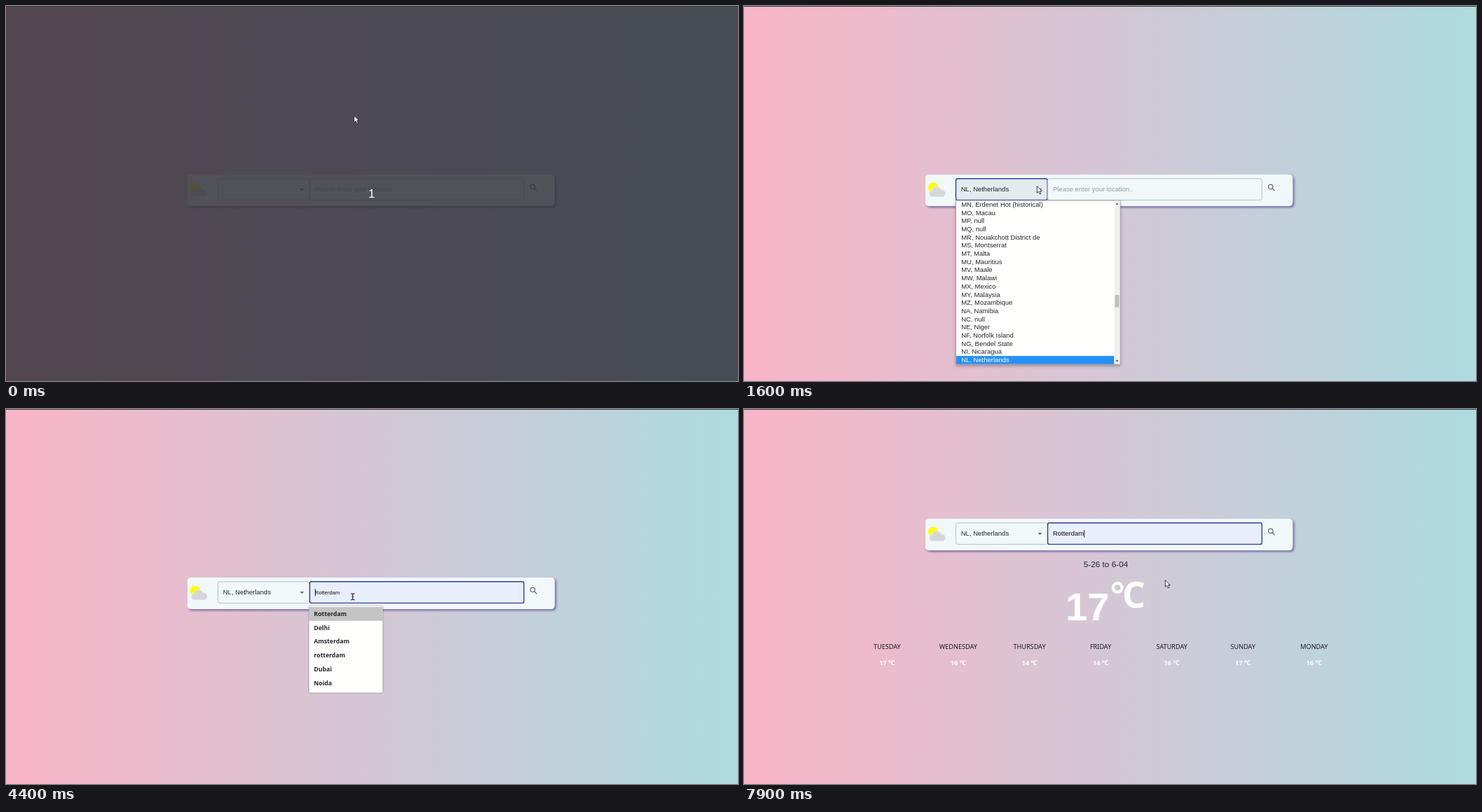
An HTML page that plays this animation: 1045 by 536 pixels, repeating every 8000 ms.

```html
<!DOCTYPE html>
<html lang="en">
<head>
<meta charset="utf-8">
<title>Weather search</title>
<style>
  html, body { margin: 0; width: 100%; height: 100%; overflow: hidden; }
  svg { display: block; width: 1045px; height: 536px; }
  text { font: 9.46px "Liberation Sans", Arial, sans-serif; fill: #222628; white-space: pre; }
  .ui { font-family: "Noto Sans", "Open Sans", sans-serif; }
  .field { fill: none; stroke: #b9c0c3; stroke-width: 1; }
  .field.hover { stroke: #34383c; }
  .field.focus { stroke: #303f9f; stroke-width: 1.4; }
  .hint { fill: #959b9e; }
  .entry { font-size: 8.7px; font-weight: 600; }
  .day { font-size: 9.15px; text-anchor: middle; fill: #1c1c20; }
  .temp { font-size: 9.2px; font-weight: 700; text-anchor: middle; fill: #fff; }
  .big { font-size: 56px; font-weight: 700; fill: #fff; }
</style>
</head>
<body>
<svg viewBox="0 0 1045 536">
  <defs>
    <linearGradient id="sky">
      <stop offset=".015" stop-color="#f8b5c7"/>
      <stop offset=".5" stop-color="#d4c7d5"/>
      <stop offset=".985" stop-color="#aedae0"/>
    </linearGradient>
    <clipPath id="listClip"><rect x="303" y="278.5" width="233.5" height="233"/></clipPath>
  </defs>
  <rect width="1045" height="536" fill="url(#sky)"/>
  <rect width="1045" height="1" fill="#3b3a40"/>

  <g id="results">
    <text x="516.5" y="225.7" text-anchor="middle" style="font-size:11.8px">5-26 to 6-04</text>
    <text class="big" x="459" y="302.3">17</text>
    <circle cx="533.3" cy="255.4" r="6.4" fill="none" stroke="#fff" stroke-width="4.2"/>
    <text class="big ui" x="540" y="283.6" style="font-size:52px">C</text>
    <g id="week"></g>
  </g>

  <g id="bar">
    <rect x="258.5" y="240.5" width="525" height="45.5" rx="5.5" fill="#f0f8fa"
      style="filter:drop-shadow(2px 2px 1.5px rgba(104,92,160,.65)) drop-shadow(0 0 .6px rgba(104,92,160,.6))"/>
    <circle cx="270" cy="259.6" r="7.2" fill="#ff0"/>
    <path d="M268.6 273a4.7 4.7 0 0 1-.4-9.3 7 7 0 0 1 13.2-1.2 5.4 5.4 0 0 1 2.4 10.5z"
      fill="#d6d6d6" stroke="#f0f8fa" stroke-width=".7"/>
    <rect id="select" class="field" x="302.5" y="246.8" width="130.7" height="30.6" rx="2.4"/>
    <text id="country" x="309.8" y="265.3">NL, Netherlands</text>
    <path d="M419.4 260.9h6.2l-3.1 3.2z" fill="#666b6d"/>
    <rect id="input" class="field" x="433.6" y="246.8" width="305.8" height="30.6" rx="2.4"/>
    <text id="hint" class="hint" x="441" y="265.3">Please enter your location..</text>
    <text id="city" x="441" y="265.3" style="fill:#0c0c10">Rotterdam</text>
    <rect id="caret" y="257" width="1" height="10.4" fill="#222"/>
    <g transform="translate(746.2 252.7) scale(.59)" fill="none" stroke="#62676a" stroke-width="2.1">
      <circle cx="9.5" cy="9.5" r="5.5"/><path d="M13.6 13.6l6.1 6.1"/>
    </g>
  </g>

  <g id="list">
    <rect x="302.5" y="278" width="234.5" height="234" fill="#fffffe" stroke="#a9a9ad"
      style="filter:drop-shadow(0 2px 2px rgba(0,0,0,.3))"/>
    <rect id="mark" x="303" width="225.5" height="11.6" fill="#2490f5"/>
    <g id="rows" clip-path="url(#listClip)"></g>
    <rect x="528.5" y="278.5" width="8" height="233" fill="#f0f0f0"/>
    <rect id="thumb" x="529.6" width="6" height="17.5" fill="#bfbfc0"/>
    <path d="M530.6 283.7h4l-2-2.4zM530.6 506.3h4l-2 2.4z" fill="#444"/>
  </g>

  <g id="popup">
    <rect x="432.7" y="281.5" width="105" height="124" rx="1.5" fill="#fffffe"
      style="filter:drop-shadow(0 .6px .8px rgba(0,0,0,.45))"/>
    <rect id="pick" x="432.7" y="283" width="105" height="19.7" fill="#c4c4c4"/>
    <g id="entries"></g>
  </g>

  <g id="dim">
    <rect width="1045" height="536" fill="rgb(53,52,60)" opacity=".85"/>
    <text x="522" y="274" text-anchor="middle" style="font-size:17px;fill:#fff">1</text>
  </g>

  <path id="arrow" d="M0 0V9.8L2.3 7.7 4 11.4 5.7 10.6 4 7H7z" fill="#fff" stroke="#26262c" stroke-width=".9"/>
  <g id="beam" fill="none">
    <path d="M-2.8-4.4Q0-4.6 0-3V3Q0 4.6-2.8 4.4M2.8-4.4Q0-4.6 0-3V3Q0 4.6 2.8 4.4" stroke="#fff" stroke-width="2.2" opacity=".6"/>
    <path d="M-2.8-4.4Q0-4.6 0-3V3Q0 4.6-2.8 4.4M2.8-4.4Q0-4.6 0-3V3Q0 4.6 2.8 4.4M-1.3 0h2.6" stroke="#2c2c34" stroke-width="1.2"/>
  </g>
</svg>
<script>
const LOOP = 8000;
const ROW = 11.7;
const $ = id => document.getElementById(id);

const topRows = ["", "AD, Andorra", "AE, United Arab Emirates", "AF, Afghanistan", "AG, Antigua and Barbuda",
  "AI, Anguilla", "AL, Albania", "AM, Armenia", "AO, Angola", "AQ, null", "AR, Argentina", "AS, null",
  "AT, Austria", "AU, Australia", "AW, Aruba", "AZ, Azerbaijan", "BA, Bosnia", "BB, Barbados",
  "BD, Bangladesh", "BE, Belgium"];
const midRows = ["MN, Erdenet Hot (historical)", "MO, Macau", "MP, null", "MQ, null", "MR, Nouakchott District de",
  "MS, Montserrat", "MT, Malta", "MU, Mauritius", "MV, Maale", "MW, Malawi", "MX, Mexico", "MY, Malaysia",
  "MZ, Mozambique", "NA, Namibia", "NC, null", "NE, Niger", "NF, Norfolk Island", "NG, Bendel State",
  "NI, Nicaragua", "NL, Netherlands"];
const cities = ["Rotterdam", "Delhi", "Amsterdam", "rotterdam", "Dubai", "Noida"];
const days = ["TUESDAY", "WEDNESDAY", "THURSDAY", "FRIDAY", "SATURDAY", "SUNDAY", "MONDAY"];
const temps = [17, 16, 14, 14, 16, 17, 16];

// time, x, y, pointer shape
const pointer = [
  [0, 497, 156.7, "arrow"], [400, 484, 176, "arrow"], [500, 448, 222, "arrow"], [600, 418.3, 257.5, "arrow"],
  [2700, 416, 255, "arrow"], [2900, 440, 261, "beam"], [3000, 472, 266, "beam"], [3100, 495, 268.3, "beam"],
  [6700, 540, 250, "arrow"], [6800, 655, 214, "arrow"], [6900, 770, 180, "arrow"], [7000, 744, 135, "arrow"],
  [7100, 702, 111.5, "arrow"], [7300, 690, 150, "arrow"], [7400, 672, 205, "arrow"],
  [7500, 648, 228, "arrow"], [7600, 632, 193, "beam"], [7900, 601.3, 244.5, "arrow"]
];
// time, caret x (0 = hidden)
const caretSteps = [[0, 0], [3600, 441], [3900, 0], [4400, 441], [5000, 485.2], [5600, 0], [6200, 485.2], [6700, 0], [7300, 485.2]];
const selectSteps = [[0, ""], [600, "hover"], [900, "focus"], [3600, ""]];
const inputSteps = [[0, ""], [2900, "hover"], [3600, "focus"]];
const listSteps = [[0, 0], [900, .6], [1000, 1], [2200, 0]];
const popupSteps = [[0, 0], [3600, 1], [5000, .35], [5100, .04], [5300, 0]];

const at = (steps, t) => steps.findLast(s => s[0] <= t);
const show = (id, on) => $(id).style.opacity = Number(on);
const label = (x, y, cls, str) => `<text x="${x}" y="${y}" class="${cls}">${str}</text>`;

$("entries").innerHTML = cities.map((c, i) => label(439.5, 296 + i * 19.7, "ui entry", c)).join("");
$("week").innerHTML = days.map((d, i) => {
  const x = 204.3 + i * 101.6;
  return label(x, 342.7, "ui day", d) + label(x, 365.6, "ui temp", temps[i] + " ℃");
}).join("");

let shownRows;
function setRows(rows, top, picked, thumbY) {
  if (rows === shownRows) return;
  shownRows = rows;
  $("rows").innerHTML = rows.map((r, i) => label(310.2, top + 9.1 + i * ROW, "", r)).join("");
  $("rows").children[picked].style.fill = "#fff";
  $("mark").setAttribute("y", top + picked * ROW + .2);
  $("thumb").setAttribute("y", thumbY);
}

function draw(t) {
  show("dim", t < 200);
  show("results", t >= 6000);
  $("bar").setAttribute("transform", `translate(0 ${t >= 6000 ? -84 : 0})`);

  const sel = at(selectSteps, t)[1], inp = at(inputSteps, t)[1];
  $("select").setAttribute("class", "field " + sel);
  $("select").style.fill = sel === "focus" ? "#e4ebee" : "none";
  $("input").setAttribute("class", "field " + inp);
  $("input").style.fill = t >= 4400 ? "#e8eefb" : "none";

  show("country", t >= 1600);
  show("hint", t < 4400);
  show("city", t >= 4400);
  $("city").style.fontSize = t < 5000 ? "7.55px" : "9.46px";

  const caretX = at(caretSteps, t)[1];
  show("caret", caretX > 0);
  $("caret").setAttribute("x", caretX);

  if (t < 1600) setRows(topRows, 278.5, 0, 288);
  else setRows(midRows, 277.7, 19, 413);
  show("list", at(listSteps, t)[1]);
  show("popup", at(popupSteps, t)[1]);
  show("pick", t >= 4400);

  const [, x, y, shape] = at(pointer, t);
  for (const id of ["arrow", "beam"]) {
    show(id, id === shape);
    $(id).setAttribute("transform", `translate(${x} ${y})`);
  }
}

const start = performance.now();
function tick() {
  draw((performance.now() - start) % LOOP);
  requestAnimationFrame(tick);
}
tick();
</script>
</body>
</html>
```
